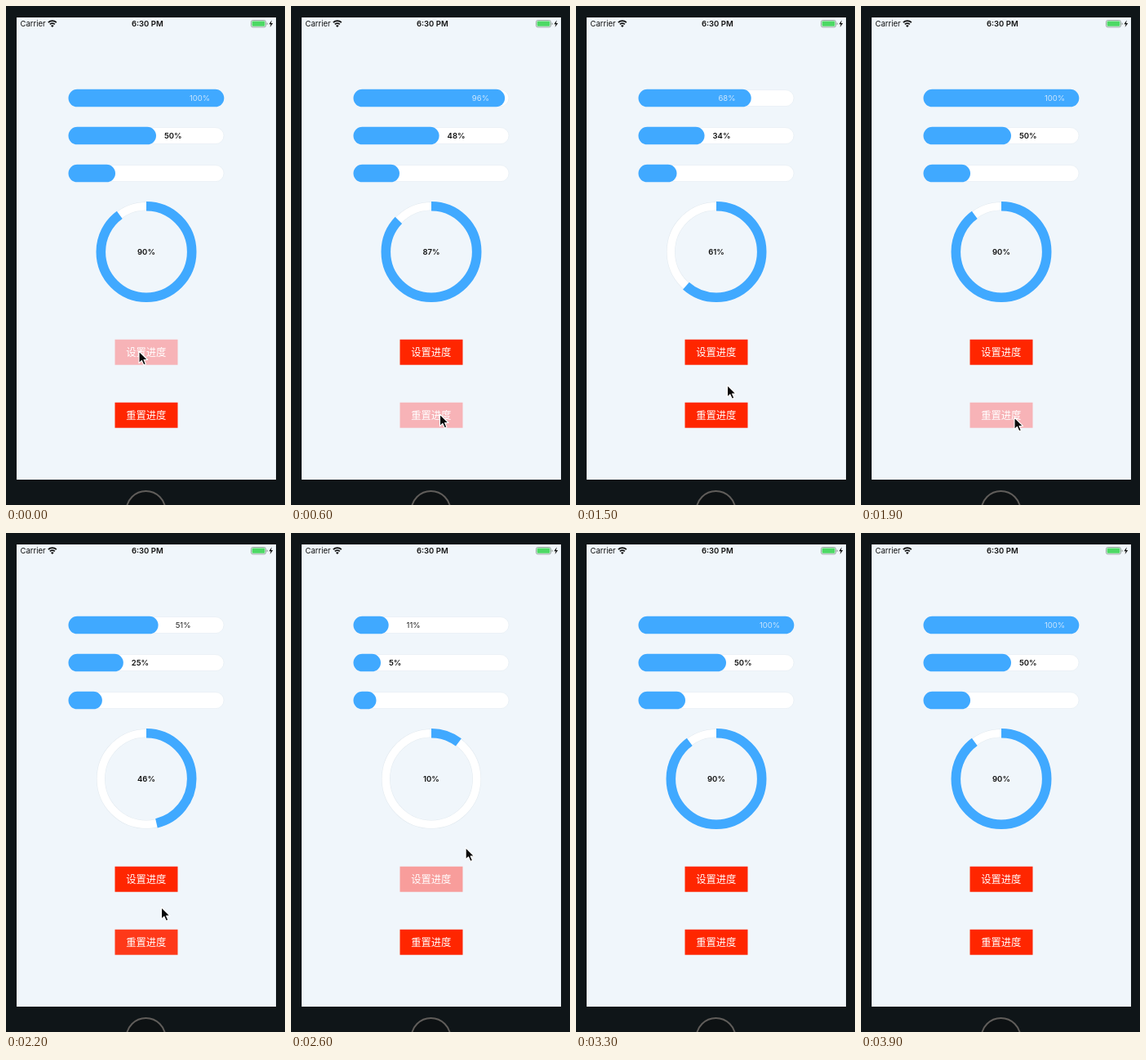
An HTML page for the animation above (4 s loop, 342 by 610 pixels).

```html
<!DOCTYPE html>
<html lang="zh">
<head>
<meta charset="utf-8">
<title>Progress views</title>
<style>
  html, body { margin: 0; width: 100%; height: 100%; overflow: hidden; background: #0f1518; }
  svg { display: block; }
  text { font-family: Inter, Roboto, sans-serif; font-size: 9.5px; fill: #111; }
  .bold { font-weight: 600; }
  .mid { text-anchor: middle; }
  .track { fill: #fff; stroke: #e3ebf1; stroke-width: .6; }
  .fill { fill: #40a9ff; }
  .button text { font: 300 12.3px "Noto Sans CJK SC", "Noto Sans CJK", "Noto Sans CJK JP", sans-serif; fill: #fff; }
</style>
</head>
<body>
<svg width="342" height="610" viewBox="0 0 342 610">
  <rect width="342" height="610" fill="#0f1518"/>
  <circle cx="171.5" cy="617" r="24" fill="#0d1113" stroke="#605d5a" stroke-width="2"/>
  <rect x="13" y="14" width="318" height="565" fill="#f0f6fb"/>

  <text x="17.5" y="25">Carrier</text>
  <g fill="none" stroke="#111" stroke-width="1.7">
    <path d="M51.8 20.2a7 7 0 0 1 10 0M53.8 22.4a4.2 4.2 0 0 1 6 0"/>
    <path d="M56.8 26l-1.9-1.9a2.7 2.7 0 0 1 3.8 0z" fill="#111" stroke="none"/>
  </g>
  <text class="bold mid" x="173.3" y="25">6:30 PM</text>
  <rect x="300.5" y="17.5" width="18" height="8.4" rx="2" fill="none" stroke="#8b9691" stroke-width=".8"/>
  <rect x="301.6" y="18.6" width="15.8" height="6.2" rx="1" fill="#4cd964"/>
  <path d="M319.6 20.2v3q1.2-.4 1.2-1.5t-1.2-1.5z" fill="#8b9691"/>
  <path d="M325.8 17.3l-3.4 4.9h2.2l-1 3.8 3.6-5.1h-2.3z" fill="#111"/>

  <g id="bars"></g>

  <circle cx="172" cy="300.5" r="55.7" fill="none" stroke="#e1e9ef" stroke-width="10.6"/>
  <circle cx="172" cy="300.5" r="55.7" fill="none" stroke="#fff" stroke-width="9.6"/>
  <circle id="ring" cx="172" cy="300.5" r="55.7" fill="none" stroke="#40a9ff" stroke-width="11.6"
    pathLength="100" transform="rotate(-90 172 300.5)"/>
  <text id="ringText" class="bold mid" x="172" y="304"></text>

  <g class="button" id="set">
    <rect x="133.5" y="407.7" width="77" height="31"/>
    <text class="mid" x="171.8" y="427.6">设置进度</text>
  </g>
  <g class="button" id="reset">
    <rect x="133.5" y="484.7" width="77" height="31"/>
    <text class="mid" x="171.8" y="504.6">重置进度</text>
  </g>

  <path id="cursor" d="M0 0V14.6L3.4 11.4L5.8 16.8L8.4 15.7L6.1 10.5H10.6Z"
    fill="#0a0a0a" stroke="#fff" stroke-width="1.1" stroke-linejoin="round"/>
</svg>
<script>
const LOOP = 4000, STEP = 100, RUN = 450, LEFT = 76.5;
const $ = id => document.getElementById(id);

// start time and direction of each progress run
const runs = [[586, -1], [1192, 1], [1982, -1], [2548.8, 1]];
// press and release times
const presses = {
  set: [[0, 100], [1130, 1192], [2450, 2549]],
  reset: [[500, 586], [1850, 1982]]
};
// time, x, y
const route = [
  [0, 163, 422], [200, 163, 422], [500, 182.5, 499], [700, 182.5, 499],
  [1000, 187.5, 414.5], [1200, 187.5, 414.5], [1500, 185.5, 463.5],
  [1800, 188, 503], [2000, 188, 503], [2200, 190.5, 457.5],
  [2400, 190, 415], [2500, 190, 415], [2900, 286.5, 293.5]
];

const clamp = v => Math.min(1, Math.max(0, v));
const mix = (a, b, k) => a + (b - a) * k;
const percent = v => Math.floor(v + 1e-6) + '%';

function make(tag, attrs) {
  const el = document.createElementNS('http://www.w3.org/2000/svg', tag);
  for (const k in attrs) el.setAttribute(k, attrs[k]);
  return $('bars').appendChild(el);
}

function makeBar(y) {
  make('rect', { class: 'track', x: 77, y: y + .8, width: 190, height: 20, rx: 10 });
  return {
    fill: make('rect', { class: 'fill', x: LEFT, y, width: 0, height: 21.5, rx: 10.75 }),
    label: make('text', { y: y + 14.2 })
  };
}

const [top1, top2, top3] = [101.8, 147.8, 193.8].map(makeBar);
top1.label.setAttribute('class', 'mid');
top2.label.setAttribute('class', 'bold');

function progress(t) {
  let p = 1;
  for (const [start, dir] of runs) {
    if (t < start) break;
    const k = clamp((t - start) / RUN);
    p = dir > 0 ? k : 1 - k;
  }
  return p;
}

function pressed(list, t) {
  let k = 0;
  for (const [down, up] of list) {
    if (t >= down) k = t <= up ? 1 : clamp((250 - (t - up)) / 235);
  }
  return k;
}

function setBar(bar, p) {
  const w = 24.2 + 166.6 * p;
  bar.fill.setAttribute('width', p > 0 ? w : 0);
  return LEFT + w;
}

function setLabel(label, x, value, color) {
  label.setAttribute('x', x);
  label.textContent = percent(value);
  label.style.fill = color;
}

function moveCursor(t) {
  const cursor = $('cursor');
  const i = route.findIndex(r => r[0] > t);
  const last = route[route.length - 1];
  cursor.style.display = t > last[0] ? 'none' : '';
  const a = i < 0 ? last : route[i - 1], b = i < 0 ? last : route[i];
  const k = a === b ? 0 : (t - a[0]) / (b[0] - a[0]);
  cursor.setAttribute('transform', `translate(${mix(a[1], b[1], k)} ${mix(a[2], b[2], k)})`);
}

function draw(t) {
  const p = progress(t), half = progress(t - 1);

  const end1 = setBar(top1, p), inside = p > .55;
  setLabel(top1.label, end1 + (inside ? -29.7 : 30.5), p * 100, inside ? '#cbe6fd' : '#222');
  const end2 = setBar(top2, half * .5);
  setLabel(top2.label, end2 + 10, half * 50, '#111');
  setBar(top3, p * .2);

  $('ring').style.display = p > 0 ? '' : 'none';
  $('ring').setAttribute('stroke-dasharray', `${p * 90} 200`);
  $('ringText').textContent = percent(p * 90);

  for (const id in presses) {
    const k = pressed(presses[id], t);
    $(id).firstElementChild.style.fill =
      `rgb(${mix(255, 247, k)},${mix(38, 179, k)},${mix(0, 183, k)})`;
  }
  moveCursor(t);
}

function tick() {
  draw(Math.floor(performance.now() % LOOP / STEP) * STEP);
  requestAnimationFrame(tick);
}
tick();
</script>
</body>
</html>
```
